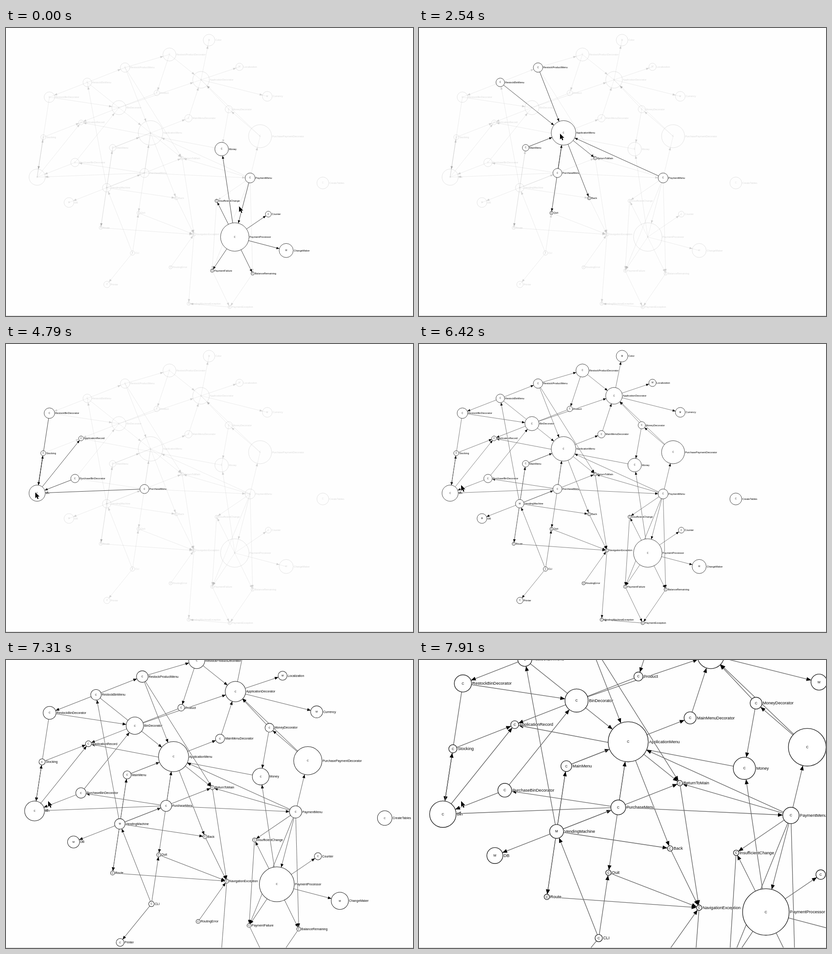
Recreate the animation shown at these times as an HTML page with a canvas. Size 889x630 px, loop 8000 ms.

```html
<!DOCTYPE html>
<html lang="en">
<head>
<meta charset="utf-8">
<title>Class graph</title>
<style>
  html, body { margin: 0; width: 100%; height: 100%; overflow: hidden; background: #fefefe; }
  canvas { display: block; }
</style>
</head>
<body>
<canvas id="stage" width="889" height="630"></canvas>
<script>
const ctx = document.getElementById('stage').getContext('2d');
const LOOP = 8000, FRAME = 150, DIM = 0.15;
const ZOOM_START = 7010, ZOOM_X = 93, ZOOM_Y = 309;
const UNIT = 0.557; // size of one graph unit before zooming

// name: [x, y, radius]
const nodes = {
  Color: [443.5, 26.5, 12.7],
  RestockProductDecorator: [357, 58, 14.3],
  Localization: [510, 85, 8],
  RestockProductMenu: [260, 86.5, 10.3],
  ApplicationDecorator: [426, 113.3, 18.2],
  RestockBinMenu: [177.5, 119, 9.4],
  Product: [329.3, 142, 6],
  Currency: [570.7, 149.5, 10.7],
  RestockBinDecorator: [94.8, 151.3, 11.5],
  BinDecorator: [246.7, 174.2, 15.5],
  MoneyDecorator: [486.6, 177.7, 7.9],
  MainMenuDecorator: [398.5, 197.4, 8.1],
  ApplicationRecord: [164, 206.5, 5.3],
  ApplicationMenu: [315.7, 229.4, 26.8],
  PurchasePaymentDecorator: [555, 236.7, 25.2],
  Stocking: [81.4, 238.8, 5.5],
  MainMenu: [233, 262, 7.2],
  Money: [471, 264.9, 14.9],
  ReturnToMain: [384.7, 284.7, 3.6],
  PurchaseBinDecorator: [150.7, 294.2, 9.2],
  PurchaseMenu: [302.4, 317.2, 9.9],
  Bin: [68, 326.3, 17.7],
  PaymentMenu: [533.2, 328, 10.9],
  CreateTables: [692, 339, 13],
  VendingMachine: [220, 349.4, 9.3],
  Back: [371.7, 372.2, 3.6],
  InsufficientChange: [460, 378, 3.6],
  DB: [137.5, 381.7, 10.7],
  Quit: [289.3, 404.6, 3.6],
  Counter: [573, 407.2, 6.4],
  Route: [207, 437, 3.6],
  NavigationException: [410.5, 451.5, 3.6],
  PaymentProcessor: [499.7, 457.2, 31.1],
  ChangeMaker: [612, 486.7, 15.4],
  CLI: [276.3, 492.2, 4.9],
  RoutingError: [359.5, 523.5, 3.6],
  PaymentFailure: [450.3, 530.8, 3.6],
  BalanceRemaining: [538.8, 537, 3.6],
  Printer: [220.5, 561, 7],
  VendingMachineException: [399, 603, 3.6],
  PaymentException: [488.7, 610.4, 3.6]
};
const modules = 'Color Localization Currency DB VendingMachine ChangeMaker'.split(' ');

const targets = {
  RestockProductDecorator: 'ApplicationDecorator Product',
  RestockProductMenu: 'RestockProductDecorator ApplicationMenu ReturnToMain',
  RestockBinMenu: 'RestockProductMenu RestockBinDecorator ApplicationMenu',
  RestockBinDecorator: 'BinDecorator Bin',
  ApplicationDecorator: 'Color Localization Currency',
  Product: 'ApplicationRecord',
  BinDecorator: 'ApplicationDecorator',
  MoneyDecorator: 'ApplicationDecorator Money',
  MainMenuDecorator: 'ApplicationDecorator',
  PurchasePaymentDecorator: 'ApplicationDecorator MoneyDecorator',
  ApplicationMenu: 'ReturnToMain Back Quit',
  Stocking: 'ApplicationRecord Bin',
  Bin: 'Stocking ApplicationRecord',
  MainMenu: 'ApplicationMenu MainMenuDecorator Route',
  Money: 'ApplicationRecord',
  PurchaseBinDecorator: 'Bin BinDecorator',
  PurchaseMenu: 'ApplicationMenu PurchaseBinDecorator Bin PaymentMenu',
  PaymentMenu: 'ApplicationMenu ReturnToMain PurchasePaymentDecorator InsufficientChange PaymentFailure PaymentProcessor BalanceRemaining',
  VendingMachine: 'RestockBinMenu MainMenu PurchaseMenu ReturnToMain Back DB Route',
  PaymentProcessor: 'Money InsufficientChange Counter ChangeMaker PaymentFailure BalanceRemaining',
  InsufficientChange: 'PaymentFailure',
  CLI: 'VendingMachine Quit Printer',
  Quit: 'NavigationException',
  Route: 'NavigationException',
  Back: 'NavigationException',
  ReturnToMain: 'NavigationException',
  RoutingError: 'NavigationException',
  NavigationException: 'VendingMachineException',
  PaymentFailure: 'PaymentException',
  BalanceRemaining: 'PaymentException',
  PaymentException: 'VendingMachineException'
};
const links = Object.entries(targets).flatMap(([from, list]) => list.split(' ').map(to => [from, to]));

// Pointer moves: start time, number of steps, destination
const moves = [
  [150, 3, 553, 231],
  [1650, 1, 549.5, 229],
  [1790, 4, 308, 231],
  [4040, 4, 64, 324.5],
  [5690, 6, 92, 308.5]
];
const hovers = [
  [0, 'PaymentProcessor'], [150, null],
  [450, 'PurchasePaymentDecorator'], [1790, null],
  [2240, 'ApplicationMenu'], [4190, null],
  [4490, 'Bin'], [6140, null]
];

function pointerAt(time) {
  let x = 509, y = 390;
  for (const [start, steps, toX, toY] of moves) {
    if (time < start) break;
    const done = Math.min(1, (Math.floor((time - start) / (FRAME - 4)) + 1) / steps);
    x += (toX - x) * done;
    y += (toY - y) * done;
  }
  return [x, y];
}

function zoomAt(time) {
  if (time < ZOOM_START) return 1;
  const step = Math.floor((time - ZOOM_START) / FRAME) + 1;
  return Math.exp(0.0719 * step - 0.0121);
}

function drawLink(from, to, color) {
  const [x1, y1] = nodes[from], [x2, y2, radius] = nodes[to];
  ctx.strokeStyle = color;
  ctx.lineWidth = 1.5 * UNIT;
  ctx.beginPath();
  ctx.moveTo(x1, y1);
  ctx.lineTo(x2, y2);
  ctx.stroke();

  ctx.save();
  ctx.translate(x2, y2);
  ctx.rotate(Math.atan2(y2 - y1, x2 - x1));
  ctx.fillStyle = '#000';
  ctx.beginPath();
  ctx.moveTo(-radius, 0);
  ctx.lineTo(-radius - 6.4, -2.6);
  ctx.lineTo(-radius - 6.4, 2.6);
  ctx.fill();
  ctx.restore();
}

function drawNode(name) {
  const [x, y, radius] = nodes[name];
  ctx.fillStyle = '#fff';
  ctx.strokeStyle = '#222';
  ctx.lineWidth = 1.5 * UNIT;
  ctx.beginPath();
  ctx.arc(x, y, radius, 0, 2 * Math.PI);
  ctx.fill();
  ctx.stroke();
}

function drawText(text, x, y, size, align) {
  ctx.font = `${size * UNIT}px "Liberation Sans", Arial, sans-serif`;
  ctx.textAlign = align;
  const baseline = y + 0.33 * size * UNIT;
  ctx.fillStyle = '#fff';
  for (const [dx, dy] of [[0, 1], [1, 0], [0, -1], [-1, 0]]) {
    ctx.fillText(text, x + dx * UNIT, baseline + dy * UNIT);
  }
  ctx.fillStyle = '#000';
  ctx.fillText(text, x, baseline);
}

function drawLabels(name) {
  const [x, y, radius] = nodes[name];
  drawText(modules.includes(name) ? 'M' : 'C', x, y, 8, 'center');
  drawText(name, x + radius + 1, y, 10, 'left');
}

function drawGraph(hover) {
  const touches = link => link.includes(hover);
  const lit = new Set(hover ? links.filter(touches).flat() : Object.keys(nodes));
  const names = Object.keys(nodes);
  const fade = on => { ctx.globalAlpha = on ? 1 : DIM; };

  const ordered = [...links].sort((a, b) => touches(a) - touches(b));
  for (const link of ordered) {
    fade(!hover || touches(link));
    drawLink(...link, touches(link) ? '#222' : '#666');
  }
  for (const draw of [drawNode, drawLabels]) {
    for (const name of names) {
      fade(lit.has(name));
      draw(name);
    }
  }
  ctx.globalAlpha = 1;
}

const arrow = new Path2D('M0 0V12.8L2.9 10.1L4.9 14.7L7.1 13.8L5.2 9.3H9.2Z');
function drawPointer(x, y) {
  ctx.save();
  ctx.translate(x, y);
  ctx.strokeStyle = '#fff';
  ctx.lineWidth = 1.6;
  ctx.stroke(arrow);
  ctx.fillStyle = '#000';
  ctx.fill(arrow);
  ctx.restore();
}

function render(time) {
  ctx.fillStyle = '#fefefe';
  ctx.fillRect(0, 0, 889, 630);
  const zoom = zoomAt(time);
  ctx.save();
  ctx.translate(ZOOM_X, ZOOM_Y);
  ctx.scale(zoom, zoom);
  ctx.translate(-ZOOM_X, -ZOOM_Y);
  drawGraph(hovers.findLast(([start]) => time >= start)[1]);
  ctx.restore();
  ctx.fillStyle = '#ccc';
  ctx.fillRect(0, 629, 889, 1);
  drawPointer(...pointerAt(time));
}

const began = performance.now();
function tick() {
  render((performance.now() - began) % LOOP);
  requestAnimationFrame(tick);
}
tick();
</script>
</body>
</html>
```
